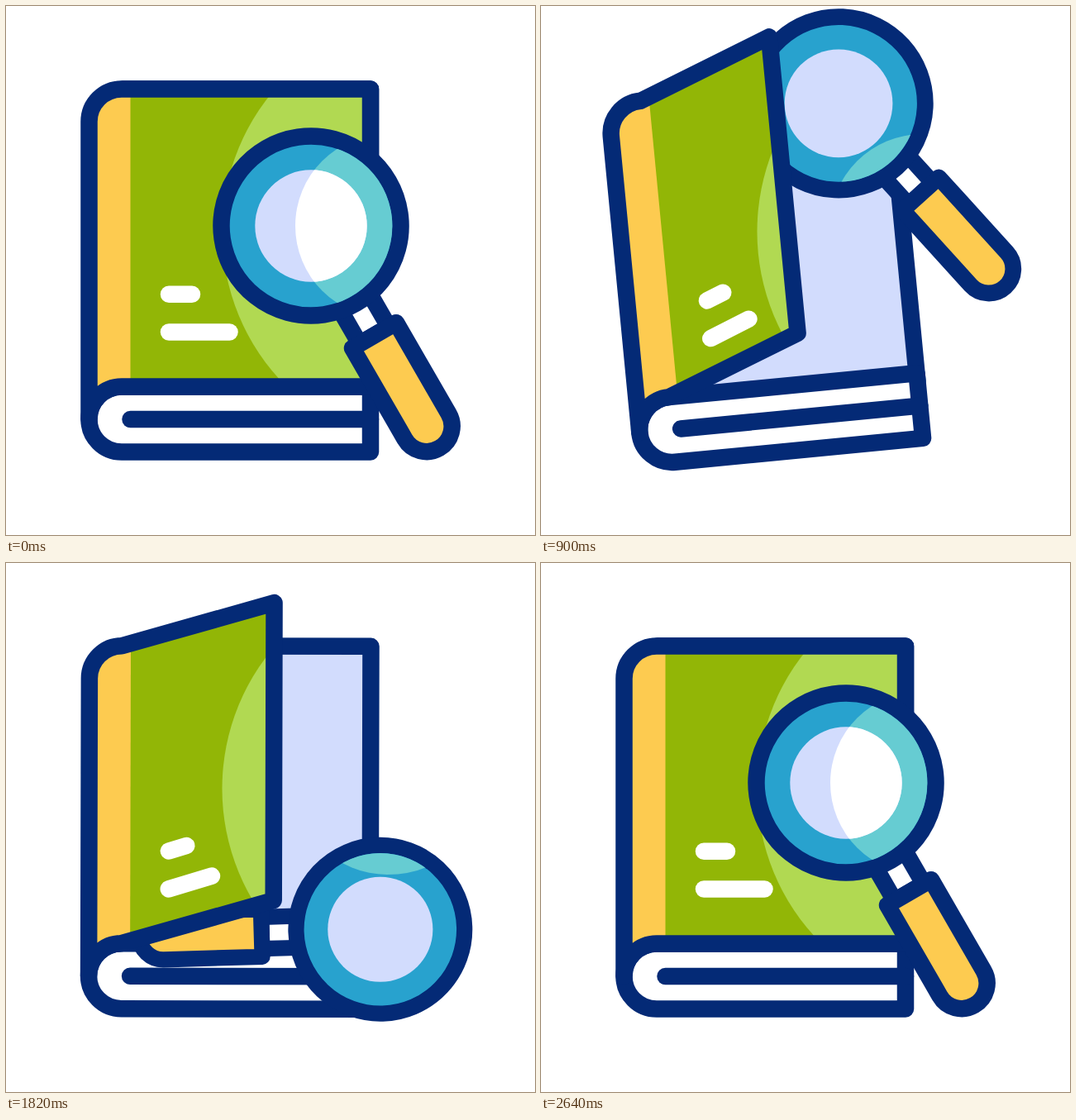
An HTML page for the animation above (3600 ms loop, 640 by 640 pixels).

```html
<!DOCTYPE html>
<html lang="en">
<head>
<meta charset="utf-8">
<title>Book and magnifier</title>
<style>
  html, body { margin: 0; width: 100%; height: 100%; overflow: hidden; background: #fff; }
  svg { display: block; width: 100vw; height: 100vh; }
  .ink { stroke: #042a76; stroke-width: 20.5; stroke-linecap: round; stroke-linejoin: round; }
  .label { stroke: #fff; stroke-width: 20.5; stroke-linecap: round; }
</style>
</head>
<body>
<svg id="stage" viewBox="0 0 640 640" fill="none">
  <defs>
    <clipPath id="coverClip"><path id="coverShape"/></clipPath>
    <clipPath id="ringClip"><circle id="ringHole"/></clipPath>
    <clipPath id="glassClip"><circle id="glassHole"/></clipPath>
    <path id="glare" d="M461 155A111 111 0 0 0 461 377Q515 377 551 338L640 221V155Z"/>
  </defs>

  <g id="pages">
    <path class="ink" fill="#d2dcfd" d="M141 100.5H441V470H141Z"/>
    <path class="ink" fill="#fff" d="M441 460.5H140A39.5 39.5 0 0 0 140 539.5H441Z"/>
    <path class="ink" d="M150.5 500H441"/>
  </g>

  <g id="cover">
    <g clip-path="url(#coverClip)">
      <rect x="90" y="0" width="400" height="560" fill="#92b606"/>
      <circle id="shine" cx="526.5" cy="273" r="265" fill="#b1d952"/>
      <rect x="90" y="80" width="60.5" height="440" fill="#fdcb50"/>
    </g>
    <path id="coverLine" class="ink"/>
    <path id="label1" class="label"/>
    <path id="label2" class="label"/>
  </g>

  <g id="lens">
    <g id="tool">
      <path class="ink" fill="#fff" d="M100 -20.4H153V20.4H100Z"/>
      <path class="ink" fill="#fdcb50" d="M153 -30.6H280A30.6 30.6 0 0 1 280 30.6H153Z"/>
      <circle class="ink" r="108.5" fill="#28a2ce"/>
    </g>
    <use href="#glare" fill="#66ccd2" clip-path="url(#ringClip)"/>
    <circle id="glass" fill="#d2dcfd"/>
    <use href="#glare" fill="#fff" clip-path="url(#glassClip)"/>
  </g>
</svg>
<script>
const LOOP = 3600;
const $ = id => document.getElementById(id);
const set = (id, attrs) => {
  for (const k in attrs) $(id).setAttribute(k, attrs[k]);
};

// Progress from a to b, held at 0 and 1 outside
const part = (t, a, b) => Math.min(1, Math.max(0, (t - a) / (b - a)));
const smooth = u => u * u * (3 - 2 * u);
// Rises from a to the peak, falls back by b
const swing = (t, a, peak, b) => smooth(part(t, a, peak)) - smooth(part(t, peak, b));

const tiltAt = t => -15 * swing(t, 410, 730, 1020) + 6.5 * swing(t, 1139, 1400, 1860);
const openAt = t => 0.488 *
  (Math.sin(part(t, 430, 1030) * Math.PI / 2) - part(t, 1198, 2258) ** 3);
const sizeAt = t => 1 - 0.24 * Math.sin(Math.PI * part(t, 740, 2040)) ** 2;

// Waypoints of the lens: time, x, y, handle angle
const route = [
  [30, 369, 266, 60],
  [500, 412, 236, 64.3],
  [700, 424, 165, 62],
  [900, 360.5, 117.8, 47.9],
  [1110, 205, 305, -72],
  [1500, 225, 330, -95],
  [1820, 452.5, 443.3, -181.4],
  [2040, 498.5, 300, -253.9],
  [2180, 460, 235, -285],
  [2580, 369, 266, -300]
];

// Monotone cubic curve through column c of the route
function along(t, c) {
  const last = route.length - 1;
  if (t <= route[0][0]) return route[0][c];
  if (t >= route[last][0]) return route[last][c];
  let i = 0;
  while (t >= route[i + 1][0]) i++;
  const slope = j => (route[j + 1][c] - route[j][c]) / (route[j + 1][0] - route[j][0]);
  const tangent = j => {
    if (j === 0 || j === last) return 0;
    const a = slope(j - 1), b = slope(j);
    return a * b <= 0 ? 0 : 2 * a * b / (a + b);
  };
  const h = route[i + 1][0] - route[i][0];
  const u = (t - route[i][0]) / h, v = 1 - u;
  return route[i][c] * smooth(v) + route[i + 1][c] * smooth(u)
    + h * u * v * (tangent(i) * v - tangent(i + 1) * u);
}

function drawBook(t) {
  const tilt = tiltAt(t), open = openAt(t);
  const turn = a => ({ transform: `rotate(${a} 279 312)` });
  set('pages', turn(tilt));
  set('cover', turn(tilt));
  set('shine', turn(-tilt));

  const right = 441 - 301 * open, rise = 135 * open;
  const d = `M100.5 500V140A39.5 39.5 0 0 1 140 100.5L${right} ${100.5 - rise}` +
    `V${460.5 - rise}L140 460.5A39.5 39.5 0 0 0 100.5 500Z`;
  set('coverShape', { d });
  set('coverLine', { d });
  set('label1', { d: `M197 348.7L${225 - 17 * open} ${348.7 - 17 * open}` });
  set('label2', { d: `M197 394.6L${270.5 - 55 * open} ${394.6 - 41 * open}` });
}

let layer = null;
function drawLens(t) {
  const [cx, cy, angle] = [1, 2, 3].map(c => along(t, c));
  const size = sizeAt(t);
  set('tool', { transform: `translate(${cx} ${cy}) rotate(${angle}) scale(${size})` });
  set('ringHole', { cx, cy, r: 98.4 * size });
  set('glassHole', { cx, cy, r: 67.7 * size });
  set('glass', { cx, cy, r: 67.7 * size });

  // The lens slips between cover and pages while the book is open
  const under = t >= 740 && t < 2040;
  if (under !== layer) {
    $('stage').insertBefore($('lens'), under ? $('cover') : null);
    layer = under;
  }
}

const start = performance.now();
function frame() {
  const t = (performance.now() - start) % LOOP;
  drawBook(t);
  drawLens(t);
  requestAnimationFrame(frame);
}
frame();
</script>
</body>
</html>
```
